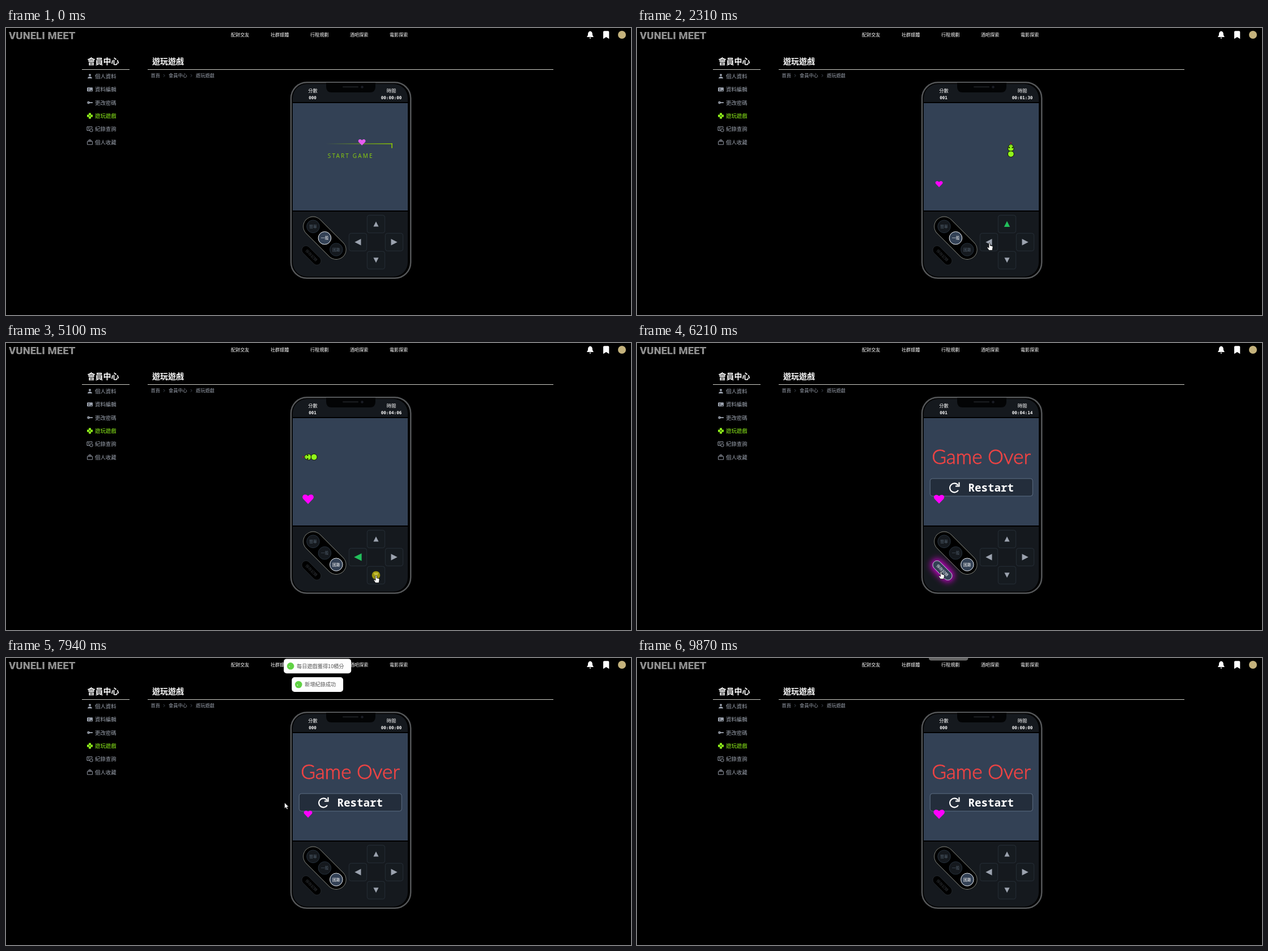
Recreate the animation shown at these times as an HTML page. Size 1103 by 508 pixels, loop 9.9 s.

```html
<!DOCTYPE html>
<html lang="zh-Hant">
<head>
<meta charset="utf-8">
<style>
html,body{margin:0;width:100%;height:100%;overflow:hidden;background:#000}
svg{display:block;width:1103px;height:508px;font-family:'Noto Sans CJK TC','Noto Sans CJK','Noto Sans CJK JP',sans-serif}
.mono{font-family:'DejaVu Sans Mono',monospace;font-weight:700}
</style>
</head>
<body>
<svg id="stage" viewBox="0 0 1103 508" xmlns="http://www.w3.org/2000/svg"></svg>
<script>
const LOOP = 9900, START = 960, OVER = 5190, HARD = 4280, SAVED = 7650;
const TICK = 208, FIRST_TICK = 1000, CELL = 10.56, LIME = '#91f51b', G = '#9ca3af';
const stage = document.getElementById('stage');

// Text placed by its vertical centre.
const text = (x, cy, s, size, fill, extra = '') =>
  `<text x="${x}" y="${cy + size * .37}" font-size="${size}" fill="${fill}" ${extra}>${s}</text>`;
const MID = 'text-anchor="middle"';
const rect = (x, y, w, h, fill, extra = '') =>
  `<rect x="${x}" y="${y}" width="${w}" height="${h}" fill="${fill}" ${extra}/>`;
const circle = (x, y, r, fill, extra = '') =>
  `<circle cx="${x}" cy="${y}" r="${r}" fill="${fill}" ${extra}/>`;

const menu = ['配對交友', '社群媒體', '行程規劃', '酒吧探索', '電影探索'];
const side = ['個人資料', '資料編輯', '更改密碼', '遊玩遊戲', '紀錄查詢', '個人收藏'];
const sideIcons = [
  circle(0, -2, 2, G) + `<path d="M-4 4C-4 -.5 4 -.5 4 4Z" fill="${G}"/>`,
  rect(-5, -3.5, 10, 7, G, 'rx="1"') + '<path d="M-3 -1h2.5M-3 1.5h2.5M1 2h3" stroke="#000"/>',
  circle(-2.5, 0, 2.4, G) + circle(-3, 0, .7, '#000') + `<path d="M-1 0H5" stroke="${G}" stroke-width="1.8"/>`,
  `<path d="M-2 -5H2V-2H5V2H2V5H-2V2H-5V-2H-2Z" fill="${LIME}"/><path d="M-2 0H2M0 -2V2" stroke="#000" stroke-width=".6"/>`,
  `<path d="M0 2.5H-5V-4H4V-2M-3 -2H-1M-3 0H-1" fill="none" stroke="${G}"/>` + circle(2.5, 2, 2.7, 'none', `stroke="${G}"`),
  `<path d="M-4.5 -1.5H4.5V4H-4.5ZM-3.5 -3H3.5M-2 -4.5H2" fill="none" stroke="${G}" stroke-width=".9"/>`
];

const modes = [['簡單', 542, 351.3], ['一般', 562.4, 371.8], ['困難', 582.8, 392.2]];
const pad = { up: [653, 347, -90, .8], left: [621, 379, 180, 1], right: [685, 379, 0, 1], down: [653, 411, 90, .8] };
const heartPath = 'M0 6L-5.5 .3C-8.5 -3.2 -3.7 -7.2 0 -3.2C3.7 -7.2 8.5 -3.2 5.5 .3Z';
const grad = (id, x1, y1, x2, y2) =>
  `<linearGradient id="${id}" x1="${x1}" y1="${y1}" x2="${x2}" y2="${y2}"><stop stop-color="#8cc800" stop-opacity="0"/><stop offset="1" stop-color="#8cc800"/></linearGradient>`;

const toast = (id, w, label) => `<g id="${id}">${rect(-w / 2, -13, w, 26, '#fff', 'rx="5"')}
  <g transform="translate(${12 - w / 2} 0)"><circle class="dot" fill="#61d345"/>
  <path class="tick" d="M-2.4 .3L-.7 2L2.6 -2.2" fill="none" stroke="#fff" stroke-width="1.3" pathLength="1" stroke-dasharray="1 2"/></g>
  ${text(23 - w / 2, 0, label, 9.2, '#555')}</g>`;

stage.innerHTML = `
<defs>
  ${grad('g0', 0, 0, 1, 0)}${grad('g1', 0, 0, 0, 1)}${grad('g2', 1, 0, 0, 0)}${grad('g3', 0, 1, 0, 0)}
  <clipPath id="button"><rect x="534" y="204" width="148" height="42"/></clipPath>
  <clipPath id="screen"><rect x="506" y="99" width="203" height="341" rx="25"/></clipPath>
  <pattern id="stripes" width="4" height="2.5" patternUnits="userSpaceOnUse">
    <rect width="4" height="2.5" fill="#555"/><rect width="4" height="1.5" fill="#b5b5b5"/></pattern>
  <filter id="blur" x="-100%" y="-100%" width="300%" height="300%"><feGaussianBlur stdDeviation="6"/></filter>
</defs>
${rect(0, 0, 1103, 508, '#000')}
<text x="5" y="19.5" font-size="18.6" font-weight="900" font-family="Roboto,sans-serif" fill="url(#stripes)">VUNELI MEET</text>
${menu.map((s, i) => text(397 + 70 * i, 12.3, s, 8.1, '#fff')).join('')}
<path d="M1031 5.5C1027 6.5 1027 10 1027 12.5L1025 16H1037L1035 12.5C1035 10 1035 6.5 1031 5.5ZM1029.3 17H1032.7Q1031 20.5 1029.3 17" fill="#fff"/>
<path d="M1054 7Q1054 5.3 1055.7 5.3H1062.5Q1064.3 5.3 1064.3 7V19.3L1059.2 16L1054 19.3Z" fill="#fff"/>
${circle(1087, 12, 7, '#c4b27c')}
${text(143.5, 59, '會員中心', 14, '#fff', 'font-weight="700"')}
${text(258, 59, '遊玩遊戲', 14, '#fff', 'font-weight="700"')}
${rect(134, 73, 84, 1, '#cfcfc8')}${rect(250, 73, 716, 1, '#cfcfc8')}
${side.map((s, i) => `<g transform="translate(148 ${85.3 + 23.4 * i})">${sideIcons[i]}</g>` +
    text(157, 85.3 + 23.4 * i, s, 9.4, i == 3 ? LIME : G)).join('')}
${text(255.5, 84.3, '首頁', 8.2, G)}${text(287, 84.3, '會員中心', 8.2, G)}${text(335, 84.3, '遊玩遊戲', 8.2, G)}
<path d="M278 82l2 2.3l-2 2.3M326 82l2 2.3l-2 2.3" fill="none" stroke="#4b5563" stroke-width=".9"/>
${rect(503, 96.3, 211.2, 346.5, '#000', 'rx="28" stroke="#555759" stroke-width="2.5"')}
<g clip-path="url(#screen)">
  ${rect(506, 99, 203, 341, '#15191e')}${rect(506, 131, 203, 194, '#000')}${rect(506, 133, 203, 190, '#334155')}
</g>
<path d="M565 97H652V104Q652 114 642 114H575Q565 114 565 104Z" fill="#030405"/>
${rect(594, 103, 28, 2.5, '#181a1d', 'rx="1.2"')}${circle(628.5, 104.5, 2.3, '#1a1d25')}
${text(541.5, 110.7, '分數', 8.2, '#fff', MID)}${text(680, 110.7, '時間', 8.2, '#fff', MID)}
${text(541, 123, '', 7.6, '#fff', MID + ' class="mono" id="score"')}
${text(680, 123, '', 7.6, '#fff', MID + ' class="mono" id="clock"')}
<g id="intro">
  <g clip-path="url(#button)">
    ${rect(534, 204, 148, 1.8, 'url(#g0)', 'class="edge"')}${rect(680.2, 204, 1.8, 42, 'url(#g1)', 'class="edge"')}
    ${rect(534, 244.2, 148, 1.8, 'url(#g2)', 'class="edge"')}${rect(534, 204, 1.8, 42, 'url(#g3)', 'class="edge"')}
  </g>
  <text x="567.7" y="229.5" font-size="10" letter-spacing="2.2" font-family="'Open Sans','Noto Sans',sans-serif" fill="#8cd00c">START GAME</text>
</g>
<g id="snake">
  <circle id="body" r="5.5" fill="${LIME}" stroke="#0a0f00"/>
  <g id="head"><path d="M5 0H9M8.5 0L10.5 -1.5M8.5 0L10.5 1.5" stroke="#a3123c" fill="none"/>
    <path d="M-5.5 0C-5.5 -7 2 -6.5 6.3 -1.5Q7 0 6.3 1.5C2 6.5 -5.5 7 -5.5 0Z" fill="${LIME}" stroke="#0a0f00"/>
    ${[-3, 3].map(y => circle(.8, y, 1.3, '#1c2a00')).join('')}
    <path d="M4.3 -.8v1.6" stroke="#1c2a00" stroke-width=".7"/></g>
</g>
<g id="ending">
  <text x="607.5" y="214" font-size="35.2" font-weight="300" ${MID} font-family="Lato,'Open Sans',sans-serif" fill="#ef4444" stroke="#ef4444" stroke-width=".8">Game Over</text>
  ${rect(517.3, 240, 181, 31, '#232d3b', 'rx="4" stroke="#64748b" stroke-width=".9"')}
  <path d="M566.5 251.5A8 8 0 1 0 567 260.5M568.5 246.5V253.3H562" fill="none" stroke="#fff" stroke-width="2.2"/>
  <text x="584.5" y="262.5" font-size="19.2" fill="#fff" font-weight="700" font-family="'Noto Sans Mono','DejaVu Sans Mono',monospace">Restart</text>
</g>
<path id="heart" d="${heartPath}"/>
<g stroke-linecap="round"><path d="M542 351.3L582.8 392.2" stroke="#85877e" stroke-width="35.5"/>
  <path d="M542 351.3L582.8 392.2" stroke="#000" stroke-width="33.8"/></g>
${modes.map(([s, x, y]) => `<g class="mode">${circle(x, y, 11.3, '#15191e')}${text(x, y, s, 6.7, '#475569', MID)}</g>`).join('')}
<g transform="translate(539 402.5) rotate(45)">
  ${rect(-24, -11, 48, 22, '#d400d4', 'rx="11" id="glow" filter="url(#blur)"')}
  ${rect(-21, -7.5, 42, 15, '#000', 'rx="7.5" id="save" stroke-width=".9"')}
  ${text(0, 0, '保存記錄', 6.7, '#333', MID + ' id="saveLabel"')}
</g>
${Object.entries(pad).map(([k, [x, y]]) =>
    rect(x - 15.7, y - 15.7, 31.4, 31.4, '#161b20', 'rx="4" stroke="#29313a" stroke-width=".9"') +
    `<path id="${k}" d="M-5.5 -5.7L5.7 0L-5.5 5.7Z"/>`).join('')}
${toast('toastTop', 119.5, '每日遊戲獲得10積分')}${toast('toastLow', 91, '新增紀錄成功')}
<g id="pointer"><circle id="ring" r="7.3" fill="#d8cc00" opacity=".68"/>
  <path id="arrow" d="M0 0V10.5L2.5 8.3L4.2 12L6 11.2L4.4 7.6H7.6Z" fill="#fff" stroke="#000" stroke-width=".7"/>
  <path id="hand" d="M-1 1Q0 -.7 1.2 1V5L5 6Q6.3 6.3 6 8L5 13.5H-.8L-4 9Q-4.3 7.2 -2.5 8L-1 9.2Z" fill="#fff" stroke="#000" stroke-width=".7"/></g>`;

const $ = id => document.getElementById(id);
const all = (sel, root = stage) => [...root.querySelectorAll(sel)];
const set = (el, attrs) => { for (const k in attrs) el.setAttribute(k, attrs[k]); };
const show = (el, on) => set(el, { visibility: on ? 'visible' : 'hidden' });
const move = (el, x, y, more = '') => set(el, { transform: `translate(${x} ${y}) ${more}` });
const clamp = v => Math.max(0, Math.min(1, v));
const smooth = v => v * v * (3 - 2 * v);

// Interpolates rows of [time, ...values].
function track(rows, t, ease = v => v) {
  let i = 0;
  while (i < rows.length - 2 && t >= rows[i + 1][0]) i++;
  const [a, b] = [rows[i], rows[i + 1]], u = ease(clamp((t - a[0]) / (b[0] - a[0])));
  return a.slice(1).map((v, n) => v + (b[n + 1] - v) * u);
}

function bezier(x1, y1, x2, y2) {
  const at = (a, b, s) => 3 * (1 - s) ** 2 * s * a + 3 * (1 - s) * s * s * b + s ** 3;
  return x => {
    let lo = 0, hi = 1;
    for (let i = 0; i < 20; i++) { const m = (lo + hi) / 2; at(x1, x2, m) < x ? lo = m : hi = m; }
    return at(y1, y2, lo);
  };
}
const easeIn = bezier(.21, 1.02, .73, 1), easeOut = bezier(.06, .71, .55, 1);

const clockRows = [[START, 0], [1130, 17], [3540, 249], [5100, 406], [5180, 414]];
const beat = [[0, 1], [300, 1.53], [740, 1.15], [1140, 1], [1200, 1]];
const path = [[0, 1085, 516], [120, 1045, 488], [680, 612, 226], [920, 608, 226], [1130, 650, 229],
  [1640, 653, 349], [1850, 653, 349], [2300, 622, 380], [2560, 622, 380], [3300, 546, 354], [3540, 544, 352],
  [3800, 546, 354], [4180, 584, 392], [4400, 584, 393], [4920, 653, 411], [5250, 653, 411],
  [5850, 537, 404], [7180, 534, 405], [7400, 534, 405], [7940, 491.5, 256], [8250, 462, 250],
  [9080, 500, 262], [9560, 1085, 500], [9640, 1092, 520]];
const clicks = [900, 1760, 2420, 4260, 5100, 7320];
const hands = [[640, 960], [1480, 1980], [2200, 2700], [3300, 3700], [4080, 4520], [4820, 5380], [5780, 7480]];

const cellXY = ([c, r]) => [506.7 + (c + .5) * CELL, 133.2 + (r + .5) * CELL];
const snakeCell = k => k <= 3 ? [11 + k, 10] : k <= 7 ? [14, 13 - k] : [21 - k, 6];

function drawGame(t) {
  const step = Math.max(0, Math.floor((t - FIRST_TICK) / TICK));
  const playing = t >= START && t < OVER;
  const dir = !playing ? '' : step < 3 ? 'right' : step < 7 ? 'up' : 'left';
  const eaten = step >= 3;
  show($('intro'), t < START);
  show($('ending'), t >= OVER);
  show($('head'), playing);
  show($('body'), playing && eaten);
  if (playing) {
    move($('head'), ...cellXY(snakeCell(step)), dir == 'left' ? 'scale(-1 1)' : dir == 'up' ? 'rotate(-90)' : '');
    move($('body'), ...cellXY(snakeCell(step - 1)));
  }
  const food = t < START ? [11, 6] : eaten ? [2, 13] : [14, 10];
  move($('heart'), ...cellXY(food), `scale(${track(beat, t % 1200, smooth)[0]})`);
  set($('heart'), { fill: t < START ? '#e65cf0' : '#ff00ff' });

  const live = t < SAVED;
  const cs = live ? Math.floor(track(clockRows, t)[0]) : 0;
  const two = n => String(n).padStart(2, '0');
  $('clock').textContent = `00:${two(Math.floor(cs / 100))}:${two(cs % 100)}`;
  $('score').textContent = live && eaten ? '001' : '000';

  const pulse = 1.1 + .1 * Math.cos((t - 115) / 1000 * 2 * Math.PI);
  for (const k in pad) {
    const [x, y, turn, size] = pad[k], on = k == dir;
    move($(k), x, y, `rotate(${turn}) scale(${on ? size * pulse : size})`);
    set($(k), { fill: on ? '#22bf5b' : G });
  }
}

function drawControls(t) {
  const chosen = t < HARD ? 1 : 2;
  all('.mode').forEach((g, i) => {
    const on = i == chosen;
    set(g.firstChild, { fill: on ? '#334155' : '#15191e', stroke: on ? '#f1f5f9' : '#25303b' });
    set(g.lastChild, { fill: on ? '#fff' : '#53616f' });
  });
  const ready = t >= OVER && t < SAVED;
  show($('glow'), ready);
  set($('save'), { fill: ready ? '#334155' : '#000', stroke: ready ? '#cbd5e1' : '#24282d' });
  set($('saveLabel'), { fill: ready ? '#fff' : '#34383d' });
  all('.edge').forEach((el, i) => {
    const p = (t / 1000 + 1.3 - .25 * i) % 1, u = (Math.min(p * 2, 1) * 2 - 1) * (i < 2 ? 1 : -1);
    i % 2 ? move(el, 0, 42 * u) : move(el, 148 * u, 0);
  });
}

function drawToast(g, t, y, enter, leave) {
  const a = easeIn(clamp((t - enter) / 350)), b = easeOut(clamp((t - leave) / 400));
  show(g, t >= enter && b < .999);
  move(g, 549.7, y - 52 * (1 - a) - 34 * b, `scale(${.6 + .4 * a - .4 * b})`);
  set(g, { opacity: (.5 + .5 * a) * (1 - b) });
  const [dot] = all('.dot', g), [tick] = all('.tick', g);
  set(dot, { r: 6.3 * smooth(clamp((t - enter - 60) / 200)) });
  set(tick, { 'stroke-dashoffset': 1 - clamp((t - enter - 240) / 200), opacity: t > enter + 240 ? 1 : 0 });
}

function drawPointer(t) {
  move($('pointer'), ...track(path, t, smooth));
  const hand = hands.some(([a, b]) => t >= a && t < b);
  show($('hand'), hand);
  show($('arrow'), !hand);
  show($('ring'), clicks.some(c => Math.abs(t - c) < 80));
}

function update(t) {
  drawGame(t);
  drawControls(t);
  drawToast($('toastTop'), t, 14.9, 7670, 9560);
  drawToast($('toastLow'), t, 47.4 - 32.5 * smooth(clamp((t - 9560) / 230)), 7660, 9790);
  drawPointer(t);
}

const began = performance.now();
function frame() {
  update((performance.now() - began) % LOOP);
  requestAnimationFrame(frame);
}
frame();
</script>
</body>
</html>
```
